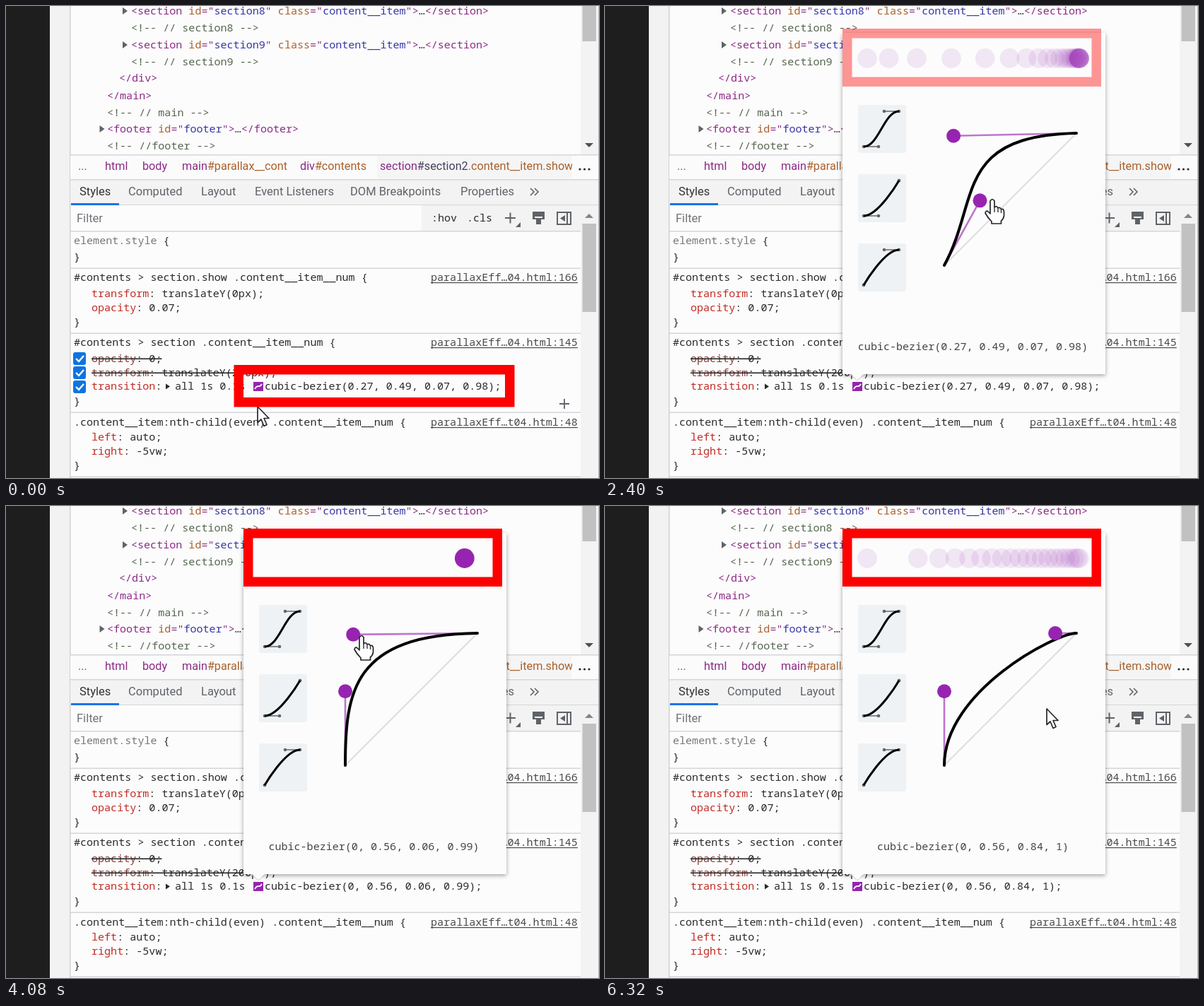
Animation of 839x668 px, one loop 6400 ms. Source, as an HTML page with a canvas:

```html
<!DOCTYPE html>
<html lang="en">
<head>
<meta charset="utf-8">
<title>Bezier editor</title>
<style>
html, body { margin: 0; width: 100%; height: 100%; overflow: hidden; background: #fcfcfc; }
canvas { display: block; }
</style>
</head>
<body>
<canvas id="stage" width="839" height="668"></canvas>
<script>
const ctx = document.getElementById('stage').getContext('2d');
const LOOP = 6400, STEP = 80;
const MONO = '15.07px "Noto Sans Mono", monospace';
const CODE = '500 ' + MONO;
const SANS = '16.5px Roboto, sans-serif';
const CRUMB = '16.2px Roboto, sans-serif';
const TAG = '#8a2a86', ATTR = '#a9602a', VALUE = '#3535a8', NOTE = '#55664f';
const PROP = '#c22b25', INK = '#2a2a2a', GREY = '#5f6368', PURPLE = '#9724b0';
const POPUP = { x: 336, y: 38, w: 372, h: 483, opens: 880 };

function rect(x, y, w, h, color) {
  ctx.fillStyle = color;
  ctx.fillRect(x, y, w, h);
}

function disc(x, y, r, color) {
  ctx.fillStyle = color;
  ctx.beginPath();
  ctx.arc(x, y, r, 0, Math.PI * 2);
  ctx.fill();
}

function stroke(d, color, width) {
  ctx.strokeStyle = color;
  ctx.lineWidth = width;
  ctx.stroke(new Path2D(d));
}

function fill(d, color) {
  ctx.fillStyle = color;
  ctx.fill(new Path2D(d));
}

// Draws coloured runs of text on one line, centred vertically on y.
function runs(x, y, font, ...parts) {
  ctx.font = font;
  for (let i = 0; i < parts.length; i += 2) {
    ctx.fillStyle = parts[i + 1];
    ctx.fillText(parts[i], x, y + 5);
    x += ctx.measureText(parts[i]).width;
  }
  return x;
}
const code = (x, y, ...parts) => runs(x, y, CODE, ...parts);
const label = (x, y, ...parts) => runs(x, y, SANS, ...parts);
const crumb = (x, ...parts) => runs(x, 227, CRUMB, ...parts);

const mix = (a, b, p) => a + (b - a) * p;

// Linear interpolation through rows of [time, ...values].
function track(rows, t) {
  let i = 0;
  while (i < rows.length - 2 && t >= rows[i + 1][0]) i++;
  const [a, b] = [rows[i], rows[i + 1]];
  const p = Math.min(1, Math.max(0, (t - a[0]) / (b[0] - a[0])));
  return a.slice(1).map((v, k) => typeof v === 'number' ? mix(v, b[k + 1], p) : v);
}

const cubic = (a, b, s) => 3 * a * s * (1 - s) ** 2 + 3 * b * s * s * (1 - s) + s ** 3;

function ease([x1, y1, x2, y2], x) {
  if (x >= 1) return 1;
  let lo = 0, hi = 1;
  for (let i = 0; i < 24; i++) {
    const mid = (lo + hi) / 2;
    if (cubic(x1, x2, mid) < x) lo = mid; else hi = mid;
  }
  return cubic(y1, y2, lo);
}

const handleTrack = [
  [0, .27, .49, .07, .98], [2560, .27, .49, .07, .98], [3200, 0, .56, .07, .98],
  [3960, 0, .56, .07, .98], [4080, 0, .56, .06, .99], [4160, 0, .56, .14, 1],
  [4400, 0, .56, .84, 1], [LOOP, 0, .56, .84, 1]
];
const cursorTrack = [
  [0, 356, 567, 'arrow'], [320, 362, 541, 'arrow'], [1520, 362, 541, 'arrow'],
  [2080, 545, 290, 'hand'], [2160, 548, 273, 'hand'], [2560, 548, 273, 'hand'],
  [3200, 487, 264, 'hand'], [3440, 487, 264, 'arrow'], [3680, 503, 183, 'hand'],
  [4080, 503, 183, 'hand'], [4400, 648, 182, 'hand'], [4560, 648, 182, 'arrow'],
  [4800, 720, 470, 'arrow'], [5040, 400, 590, 'arrow'], [5360, 131, 537, 'beam'],
  [5520, 131, 537, 'arrow'], [5760, 400, 600, 'arrow'], [6000, 785, 560, 'arrow'],
  [6320, 625, 287, 'arrow'], [LOOP, 625, 287, 'arrow']
];
const frameFade = [[880, 0], [1280, .11], [2400, .41], [3040, 1], [LOOP, 1]];
const previews = [
  { start: 877, trailEnd: 2600, curve: [.27, .49, .07, .98] },
  { start: 3381, trailEnd: 3960, curve: [0, .56, .07, .98] },
  { start: 4470, trailEnd: LOOP, curve: [0, .56, .84, 1] }
];

const bezierText = h => `cubic-bezier(${h.map(v => +v.toFixed(2)).join(', ')})`;

function tree() {
  const section = (y, id) => {
    fill(`M165 ${y - 5}l7 5l-7 5z`, GREY);
    code(177, y, '<section ', TAG, 'id', ATTR, '="', TAG, id, VALUE, '" ', TAG, 'class', ATTR,
      '="', TAG, 'content__item', VALUE, '">', TAG, '…', INK, '</section>', TAG);
  };
  section(7, 'section8');
  code(177, 31, '<!-- // section8 -->', NOTE);
  section(55, 'section9');
  code(177, 79, '<!-- // section9 -->', NOTE);
  code(160, 102, '</div>', TAG);
  code(143, 127, '</main>', TAG);
  code(143, 151, '<!-- // main -->', NOTE);
  fill('M132.500 169l7 5l-7 5z', GREY);
  code(143, 174, '<footer ', TAG, 'id', ATTR, '="', TAG, 'footer', VALUE, '">', TAG,
    '…', INK, '</footer>', TAG);
  code(143, 198, '<!-- //footer -->', NOTE);
}

function bars() {
  rect(91, 210, 748, 35, '#fbfbfb');
  rect(91, 210, 748, 1.5, '#d5d5d7');
  rect(525, 212, 275, 32, '#f5f5f6');
  crumb(102, '...', GREY);
  crumb(140, 'html', TAG);
  crumb(193, 'body', TAG);
  crumb(249, 'main', TAG, '#parallax__cont', ATTR);
  crumb(416, 'div', TAG, '#contents', ATTR);
  crumb(529, 'section', TAG, '#section2', '#45405c', '.content__item.show', ATTR);
  rect(801, 212, 38, 32, '#fbfbfb');
  [812, 818.5, 825].forEach(x => disc(x, 231, 1.6, INK));

  rect(91, 245, 748, 37, '#f3f3f4');
  rect(91, 245, 748, 1.5, '#d5d5d7');
  const tabs = { Styles: 104, Computed: 173, Layout: 276, 'Event Listeners': 352,
    'DOM Breakpoints': 487, Properties: 643 };
  for (const name in tabs) label(tabs[name], 263, name, name === 'Styles' ? '#333' : GREY);
  stroke('M742 258l5 5l-5 5M748 258l5 5l-5 5', GREY, 1.6);
  rect(91, 281, 748, 1, '#d5d5d7');
  rect(92, 279, 68, 3, '#1a73e8');

  rect(588, 282, 251, 37, '#f3f3f4');
  label(100, 301, 'Filter', '#707378');
  code(602, 300, ':hov', INK);
  code(652, 300, '.cls', INK);
  stroke('M706 300h15M713.500 292.500v15', GREY, 2);
  fill('M728 306v7h-7z', GREY);
  fill('M745 291h17v11h-5v7h-7v-7h-5z', GREY);
  stroke('M748 299h11', '#f3f3f4', 2);
  stroke('M780 292h19v17h-19zM794 292v17', GREY, 2);
  fill('M791 296v9l-7 -4.500z', GREY);
  rect(91, 318, 748, 1.5, '#d5d5d7');
}

function scrollbars() {
  rect(813, 0, 25, 210, '#f3f3f3');
  rect(815.5, 0, 19.5, 50, '#c1c1c1');
  fill('M819 194h12l-6 6z', '#505050');
  rect(813, 284, 25, 384, '#f3f3f3');
  rect(815.5, 308, 19.5, 125, '#c1c1c1');
  fill('M819 300h12l-6 -6z', '#858585');
  rect(838, 0, 1, 668, '#bbb');
}

function checkbox(y) {
  ctx.fillStyle = '#0f74e0';
  ctx.beginPath();
  ctx.roundRect(95, y - 9, 18, 18, 3);
  ctx.fill();
  stroke(`M99 ${y}l4 4l7 -8`, '#fff', 2.4);
}

function source(y, text) {
  const end = code(601, y, text, '#4a4a4a');
  rect(601, y + 7, end - 601, 1.2, '#4a4a4a');
}

function declaration(y, name, value, struck) {
  const end = code(121, y, name, struck ? '#8c3a36' : PROP, `: ${value};`, INK);
  if (struck) rect(121, y - .5, end - 121, 1.6, '#222');
}

function rules(handles, hovered, popupOpen) {
  code(96, 332, 'element.style', '#777', ' {', INK);
  code(96, 355, '}', INK);
  [371, 463, 575, 666].forEach(y => rect(91, y - .5, 722, 1.5, '#d5d5d7'));

  code(96, 384, '#contents > section.show .content__item__num {', INK);
  source(384, 'parallaxEff…04.html:166');
  declaration(407, 'transform', 'translateY(0px)');
  declaration(427, 'opacity', '0.07');
  code(96, 447, '}', INK);

  code(96, 476, '#contents > section .content__item__num {', INK);
  source(476, 'parallaxEff…04.html:145');
  declaration(499, 'opacity', '0', true);
  declaration(519, 'transform', 'translateY(200px)', true);
  code(121, 538, 'transition', PROP, ':', INK);
  fill('M226 534.500l6 4l-6 4z', INK);
  code(239, 538, 'all 1s 0.1s', INK);
  rect(350, 532, 14, 13, PURPLE);
  stroke('M352 542C356 534 358 542 362 535', '#fff', 1.8);
  code(366, 538, bezierText(handles) + ';', INK);
  code(96, 559, '}', INK);

  code(96, 589, '.content__item:nth-child(even) .content__item__num {', INK);
  source(589, 'parallaxEff…t04.html:48');
  declaration(610, 'left', 'auto');
  declaration(630, 'right', '-5vw');
  code(96, 650, '}', INK);

  if (hovered === 2) {
    [499, 519, 539].forEach(checkbox);
    if (!popupOpen) stroke('M783 563h14M790 556v14', GREY, 1.8);
  }
  if (hovered === 3) [610, 630].forEach(checkbox);
}

function preset(y, hasStart, hasEnd) {
  ctx.fillStyle = '#eff2f4';
  ctx.beginPath();
  ctx.roundRect(358, y, 68, 68, 3);
  ctx.fill();
  const [x0, y0, x1, y1] = [366, y + 59, 416, y + 9];
  const a = hasStart ? 387 : x0, b = hasEnd ? 395 : x1;
  const grey = '#666';
  stroke(`M${x0} ${y0}H${a}M${b} ${y1}H${x1}`, grey, 1.5);
  [[x0, y0], [a, y0], [b, y1], [x1, y1]].forEach(([x, v]) => disc(x, v, 2.3, grey));
  stroke(`M${x0} ${y0}C${a} ${y0} ${b} ${y1} ${x1} ${y1}`, '#000', 3);
}

function ball(t) {
  const run = previews.filter(p => t >= p.start).pop();
  if (!run) return;
  const age = t - run.start;
  const place = x => 371 + 300 * ease(run.curve, x);
  if (t < run.trailEnd) {
    ctx.globalAlpha = .1;
    for (let i = 0; i <= 20; i++) {
      if (i / 20 <= age / 1440) disc(place(i / 20), 74, 13.9, PURPLE);
    }
  }
  ctx.globalAlpha = Math.max(0, Math.min(1, (1600 - age) / 160));
  disc(place(age / 1440), 74, 13.9, PURPLE);
  ctx.globalAlpha = 1;
}

function popup(t, handles) {
  const { x, y, w, h } = POPUP;
  ctx.save();
  ctx.shadowColor = 'rgba(0,0,0,.36)';
  ctx.shadowBlur = 6;
  ctx.shadowOffsetY = 1.5;
  rect(x, y, w, h, '#fcfcfc');
  ctx.restore();
  fill('M347 520h20l-10 10z', '#fcfcfc');
  stroke('M348 522l9 8l9 -8', '#ccc', 1);
  preset(140, true, true);
  preset(238, true, false);
  preset(336, false, true);

  const [x1, y1, x2, y2] = handles;
  const px = v => 480 + 187 * v, py = v => 367 - 187 * v;
  const a = [px(x1), py(y1)], b = [px(x2), py(y2)];
  stroke('M480 367L667 180', '#dedee0', 2);
  stroke(`M480 367L${a}M667 180L${b}`, '#bd76cc', 2.6);
  ctx.lineCap = 'round';
  stroke(`M480 367C${a} ${b} 667 180`, '#000', 4);
  ctx.lineCap = 'butt';
  disc(...a, 10, PURPLE);
  disc(...b, 10, PURPLE);

  const text = bezierText(handles);
  ctx.font = MONO;
  runs(520.5 - ctx.measureText(text).width / 2, 482, MONO, text, '#444');
  ball(t);
  ctx.globalAlpha = track(frameFade, t)[0];
  redFrame(336, 32, 366, 82);
  ctx.globalAlpha = 1;
}

function redFrame(x, y, w, h) {
  ctx.strokeStyle = '#fe0000';
  ctx.lineWidth = 13.5;
  ctx.strokeRect(x + 6.75, y + 6.75, w - 13.5, h - 13.5);
}

const cursors = {
  arrow: 'M0 0V22.500L5 18L9 27.500L13 25.500L9 16.500H16z',
  hand: 'M-3 3Q0 -2 3 3V12Q6 9 8 13Q11 11 12.500 15Q16 13 16.500 18V24Q15.500 29 12.500 31V35' +
    'H-1V32Q-7 26 -10 20Q-9 15.500 -6 18L-3 21z'
};

function drawCursor(x, y, kind) {
  ctx.save();
  ctx.translate(x, y);
  ctx.lineJoin = 'round';
  if (kind === 'beam') {
    stroke('M-5 -12H-1L0 -11L1 -12H5M0 -11V9M-5 10H-1L0 9L1 10H5', '#222', 2);
  } else {
    fill(cursors[kind], '#fff');
    stroke(cursors[kind], '#26262c', 1.7);
    if (kind === 'hand') stroke('M3 12v7M8 14v5M12.500 16v4', '#26262c', 1.3);
  }
  ctx.restore();
}

function draw(t) {
  const handles = track(handleTrack, t);
  const [cx, cy, kind] = track(cursorTrack, t);
  const open = t >= POPUP.opens;
  const covered = open && cx > POPUP.x && cx < POPUP.x + POPUP.w && cy < POPUP.y + POPUP.h;
  const hovered = covered || cy < 463 ? 0 : cy < 575 ? 2 : 3;

  rect(0, 0, 839, 668, '#fcfcfc');
  rect(0, 0, 62, 668, '#1e1e1e');
  rect(62, 0, 29, 668, '#f2f2f3');
  rect(90, 0, 1.5, 668, '#d0d0d2');
  tree();
  bars();
  rules(handles, hovered, open);
  scrollbars();
  if (open) popup(t, handles);
  drawCursor(cx, cy, kind);
  if (!open) redFrame(322.5, 508, 397, 59.5);
}

const origin = performance.now();
function tick() {
  const t = (performance.now() - origin) % LOOP;
  draw(Math.floor(t / STEP) * STEP);
  requestAnimationFrame(tick);
}
tick();
</script>
</body>
</html>
```
